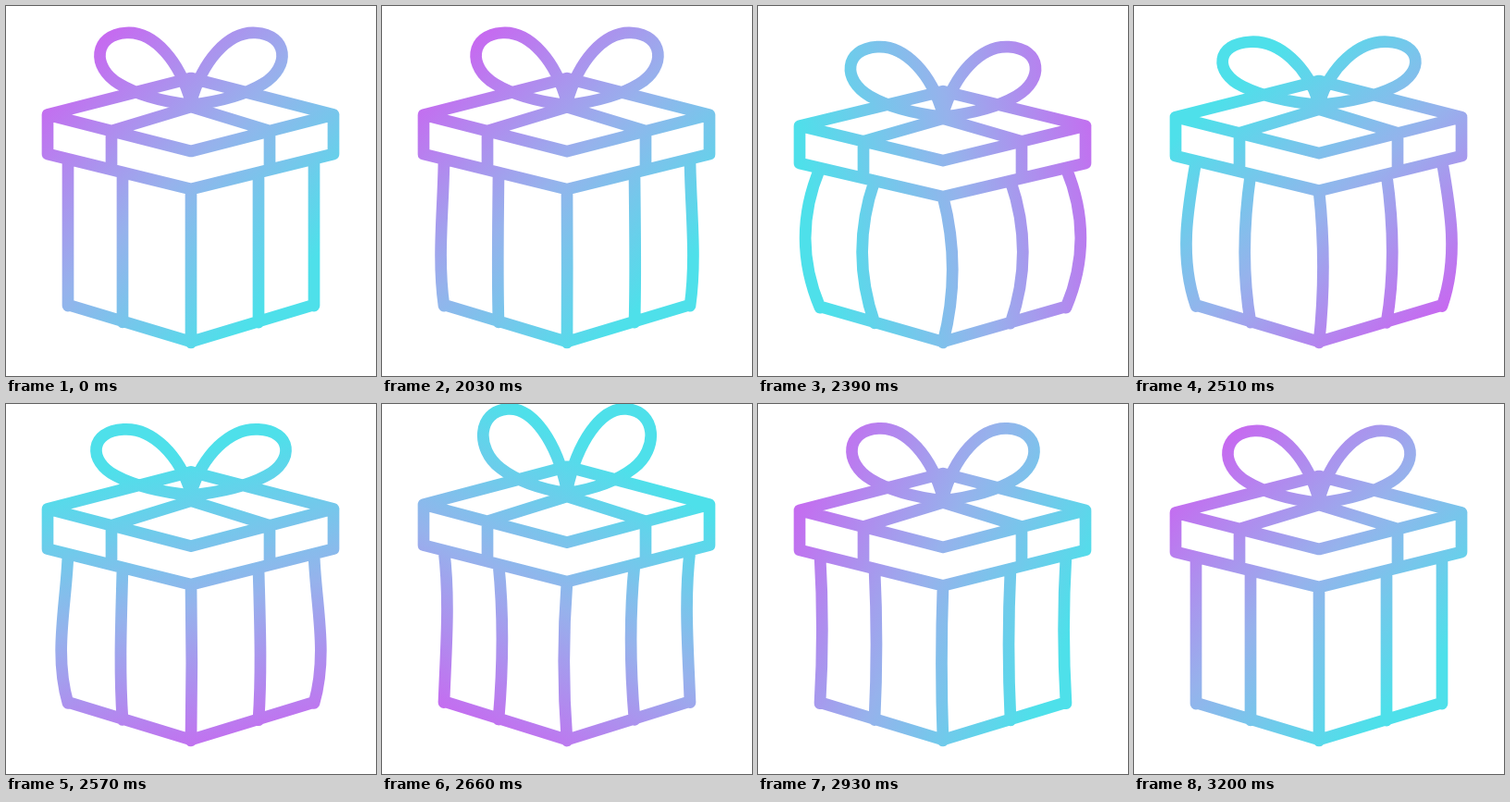
Recreate the animation shown at these times as an HTML page with a canvas. Size 400 by 400 pixels, loop 3230 ms.

```html
<!DOCTYPE html>
<html lang="en">
<head>
<meta charset="utf-8">
<title>Gift box</title>
<style>
  html, body { margin: 0; width: 100%; height: 100%; overflow: hidden; background: #fff; }
  canvas { display: block; }
</style>
</head>
<body>
<canvas width="400" height="400"></canvas>
<script>
const ctx = document.querySelector('canvas').getContext('2d');

const LOOP = 3230, REST = 2030, STEP = 30, STEPS = 40;
const CX = 200, FLOOR = 363;
const PURPLE = '#c66af0', MIDDLE = '#96b2ec', CYAN = '#4ee0ea';

const clamp = v => Math.min(1, Math.max(0, v));
const wave = u => (1 - Math.cos(Math.PI * clamp(u))) / 2;
const smooth = u => u * u * (3 - 2 * u);

// Sine easing through successive extremes [step, value], starting from zero
function swing(step, ...extremes) {
  let start = 0, value = 0;
  for (const [end, goal] of extremes) {
    value += (goal - value) * wave((step - start) / (end - start));
    start = end;
  }
  return value;
}

// Single bump that is zero outside center ± reach
const hump = (step, center, reach) => wave(1 - Math.abs(step - center) / reach);

function poseAt(step) {
  const rebound = hump(step, 19, 5);
  return {
    squash: swing(step, [12.5, 0.05], [22, -0.036], [36, 0]),
    bulge: swing(step, [11, 27], [24, -10], [36, 0]),
    low: 14 * (hump(step, 2, 2) + rebound),
    stretch: swing(step, [8, 5], [18, -10], [22, 13], [30, 0]),
    lift: 4 * rebound,
    angle: 45 + 360 * smooth(1 - (1 - step / STEPS) ** 1.28)
  };
}

function gradient(degrees) {
  const a = degrees * Math.PI / 180, shift = -20, r = 165;
  const along = d => [CX + d * Math.cos(a), 200 + d * Math.sin(a)];
  const g = ctx.createLinearGradient(...along(shift - r), ...along(shift + r));
  [PURPLE, MIDDLE, CYAN].forEach((color, i) => g.addColorStop(i / 2, color));
  return g;
}

function draw(step) {
  const pose = poseAt(step);
  const Y = y => y + (FLOOR - y) * pose.squash;

  const line = (points, closed) => {
    points.forEach(([x, y], i) => i ? ctx.lineTo(x, Y(y)) : ctx.moveTo(x, Y(y)));
    if (closed) ctx.closePath();
  };

  ctx.fillStyle = '#fff';
  ctx.fillRect(0, 0, 400, 400);
  ctx.strokeStyle = gradient(pose.angle);
  ctx.lineWidth = 12.7;
  ctx.lineCap = ctx.lineJoin = 'round';
  ctx.beginPath();

  // Lid with ribbon
  line([[45, 117.5], [200, 78], [354, 117.5], [200, 157]], true);
  line([[45, 117.5], [45, 160], [200, 198], [354, 160], [354, 117.5]]);
  line([[114, 175], [114, 135], [200, 109], [285, 135], [285, 175]]);

  // Body: columns bend away from the middle
  line([[67, 323], [200, FLOOR], [333, 323]]);
  for (const x of [67, 126, 200, 273, 333]) {
    const u = (x - CX) / 133, away = Math.abs(x - CX);
    const top = Y(198 - away * 0.245), bottom = Y(FLOOR + 1 - away * 0.3);
    const bend = pose.bulge * (u < 0 ? -1 : 1) * (0.55 + 0.3 * Math.abs(u));
    const third = (bottom - top) / 3;
    ctx.moveTo(x, top);
    ctx.bezierCurveTo(x + bend, top + third, x + bend + pose.low * u ** 3, bottom - third, x, bottom);
  }

  // Bow
  const knot = Y(107) - pose.lift;
  const sx = 1 - 0.6 * pose.stretch / 98, sy = 1 + pose.stretch / 78;
  for (const side of [-1, 1]) {
    const p = (dx, dy) => [CX + side * dx * sx, knot + dy * sy];
    ctx.moveTo(...p(0, -3));
    ctx.bezierCurveTo(...p(12, -47), ...p(40, -80), ...p(70, -78));
    ctx.bezierCurveTo(...p(105, -76), ...p(108, -41), ...p(78, -23));
    ctx.bezierCurveTo(...p(55, -9), ...p(25, -3), ...p(0, 0));
  }
  ctx.stroke();
}

function tick() {
  const t = performance.now() % LOOP;
  draw(t < REST ? 0 : Math.floor((t - REST) / STEP) + 1);
  requestAnimationFrame(tick);
}
tick();
</script>
</body>
</html>
```
